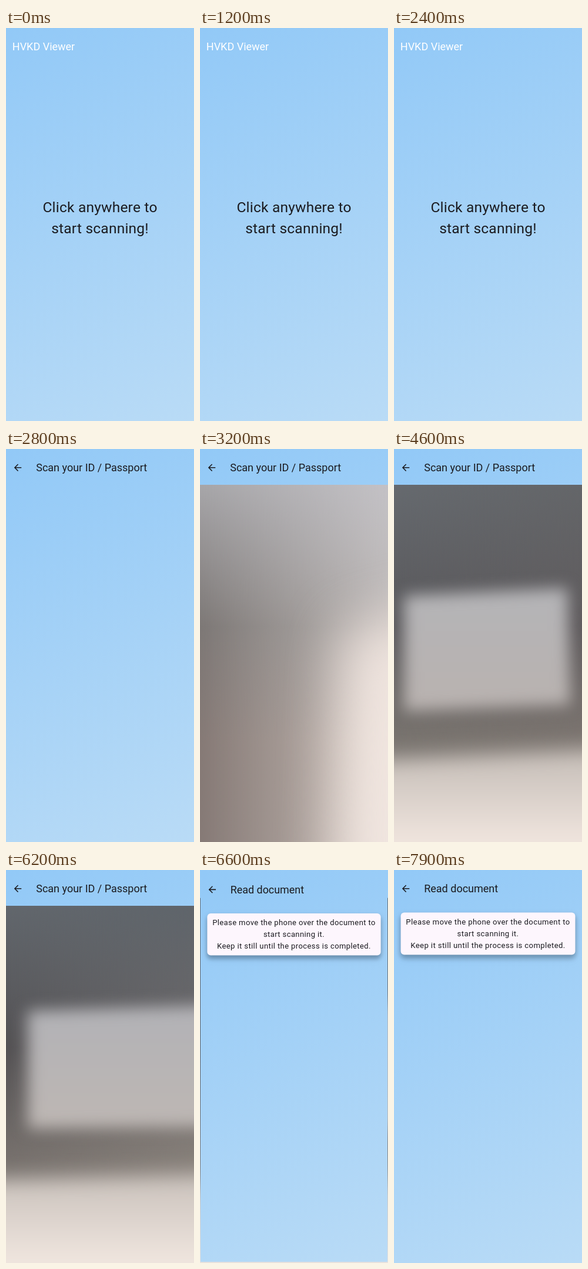
These frames come from a looping animation (320x670 px, 8000 ms). An HTML page:

```html
<!DOCTYPE html>
<html lang="en">
<head>
<meta charset="utf-8">
<title>Document scanner</title>
<style>
  html, body { margin: 0; width: 100%; height: 100%; overflow: hidden; background: #a5d1f7; }
  svg { display: block; width: 100%; height: 100%; }
  text { font-family: Roboto, sans-serif; fill: #1b1b20; white-space: pre; }
  .title { font-size: 18px; }
  .hint { font-size: 24.55px; letter-spacing: .2px; text-anchor: middle; }
  .note { font-size: 13.1px; letter-spacing: .4px; text-anchor: middle; }
</style>
</head>
<body>
<svg viewBox="0 0 320 670">
  <defs>
    <linearGradient id="sky" gradientUnits="userSpaceOnUse" x1="0" y1="0" x2="320" y2="670">
      <stop stop-color="#92c9f7"/><stop offset="1" stop-color="#b9dbf6"/>
    </linearGradient>
    <linearGradient id="left" gradientUnits="userSpaceOnUse" x1="0" y1="61" x2="0" y2="500">
      <stop/><stop offset=".55"/><stop offset="1"/>
    </linearGradient>
    <linearGradient id="right" gradientUnits="userSpaceOnUse" x1="0" y1="61" x2="0" y2="500">
      <stop/><stop offset=".55"/><stop offset="1"/>
    </linearGradient>
    <linearGradient id="paper" gradientUnits="userSpaceOnUse" x1="0" y1="240" x2="0" y2="450">
      <stop/><stop offset="1"/>
    </linearGradient>
    <linearGradient id="desk" gradientUnits="userSpaceOnUse" x1="0" y1="540" x2="0" y2="670">
      <stop/><stop offset="1"/>
    </linearGradient>
    <linearGradient id="fade"><stop stop-color="#000"/><stop offset="1" stop-color="#fff"/></linearGradient>
    <mask id="across" style="mask-type:luminance"><rect width="320" height="670" fill="url(#fade)"/></mask>
    <clipPath id="preview"><rect y="61" width="320" height="609"/></clipPath>
    <filter id="soft" filterUnits="userSpaceOnUse" x="-200" y="-100" width="720" height="970" color-interpolation-filters="sRGB">
      <feGaussianBlur stdDeviation="14"/>
    </filter>
    <filter id="deskSoft" filterUnits="userSpaceOnUse" x="-200" y="300" width="720" height="700" color-interpolation-filters="sRGB">
      <feGaussianBlur stdDeviation="17"/>
    </filter>
    <filter id="shade" x="-10%" y="-30%" width="120%" height="180%" color-interpolation-filters="sRGB">
      <feDropShadow dx="0" dy="6" stdDeviation="4" flood-color="#123" flood-opacity=".28"/>
      <feDropShadow dx="0" dy="3" stdDeviation="5" flood-color="#123" flood-opacity=".14"/>
    </filter>
    <path id="back" transform="translate(10.64 22.4) scale(.78)" fill="#1b1b20"
      d="M20 11H7.83l5.59-5.59L12 4l-8 8 8 8 1.41-1.41L7.83 13H20z"/>
  </defs>
  <rect width="320" height="670" fill="url(#sky)"/>

  <g id="home">
    <rect width="320" height="670" fill="url(#sky)"/>
    <text class="title" x="10.8" y="38.2" style="fill:#fff">HVKD Viewer</text>
    <text class="hint" x="160" y="314.4">Click anywhere to</text>
    <text class="hint" x="160" y="349.5">start scanning!</text>
  </g>

  <g id="scan">
    <rect width="320" height="670" fill="url(#sky)"/>
    <g id="camera" clip-path="url(#preview)">
      <rect width="320" height="670" fill="url(#left)"/>
      <rect width="320" height="670" fill="url(#right)" mask="url(#across)"/>
      <polygon id="sheet" fill="url(#paper)" filter="url(#soft)"/>
      <polygon id="table" fill="url(#desk)" filter="url(#deskSoft)"/>
    </g>
    <use href="#back"/>
    <text class="title" x="51.2" y="38.2">Scan your ID / Passport</text>
  </g>

  <g id="read">
    <rect width="320" height="670" fill="url(#sky)"/>
    <use href="#back"/>
    <text class="title" x="51.2" y="38.2">Read document</text>
    <rect x="11.5" y="72.5" width="297" height="72" rx="6" fill="#fdf6fd" filter="url(#shade)"/>
    <text class="note" x="160" y="93">Please move the phone over the document to</text>
    <text class="note" x="160" y="112.8">start scanning it.</text>
    <text class="note" x="160" y="132.6">Keep it still until the process is completed.</text>
  </g>
</svg>
<script>
const LOOP = 8000, OPEN_SCAN = 2500, CAMERA_ON = 2900, OPEN_READ = 6400, ZOOM = 300;
const $ = id => document.getElementById(id);
const clamp = v => Math.min(1, Math.max(0, v));
const smooth = v => v * v * (3 - 2 * v);
const easeOut = v => 1 - (1 - v) ** 3;
const mix = (a, b, k) => a.map((v, i) => v + (b[i] - v) * k);
const rgb = s => s.split(' ').map(h => [0, 2, 4].map(i => parseInt(h.substr(i, 2), 16)));

const pose = (left, right, paper, desk, sheet, table, blur) =>
  ({ colors: { left: rgb(left), right: rgb(right), paper: rgb(paper), desk: rgb(desk) }, sheet, table, blur: [blur] });

// sheet: four corners; table: height of its edge at the left and right
const wall = pose('a7a6a9 7d7876 867a76', 'c3c1c5 bdb8b6 c9bfb9', 'eadfda f0e5df', 'ebe2dc fdf4ec',
  [245, 310, 600, 220, 600, 800, 225, 800], [900, 780], 45);
const passing = pose('8f8f91 8a8785 7b7672', '868789 75726f 706c69', 'e7e3e2 e6deda', 'e6ddd7 fdf5ee',
  [-150, 212, 208, 228, 188, 476, -150, 464], [560, 592], 16);
const centred = pose('666a6f 59585b 7a7570', '646669 5f5b5d 7d7671', 'b4b4b7 b9b2af', 'cbc3bd f0e5de',
  [17, 250, 295, 237, 300, 436, 17, 447], [528, 514], 13);
const shifted = pose('62676d 555355 78726e', '5f656b 6b6768 87807a', 'b2b2b6 beb7b3', 'cec6c0 f0e6df',
  [37, 240, 420, 229, 420, 437, 37, 441], [527, 520], 13);

const track = [[3200, wall], [3700, passing], [4600, centred], [6200, shifted]];

function drawCamera(t) {
  let i = 0;
  while (i < track.length - 2 && t >= track[i + 1][0]) i++;
  const [t0, a] = track[i], [t1, b] = track[i + 1];
  const k = smooth(clamp((t - t0) / (t1 - t0)));
  for (const id in a.colors)
    [...$(id).children].forEach((stop, n) =>
      stop.setAttribute('stop-color', `rgb(${mix(a.colors[id][n], b.colors[id][n], k).map(Math.round)})`));
  const [yl, yr] = mix(a.table, b.table, k), slope = yr - yl;
  $('sheet').setAttribute('points', mix(a.sheet, b.sheet, k).join(' '));
  $('table').setAttribute('points', `-160 ${yl - slope / 2} 480 ${yr + slope / 2} 480 950 -160 950`);
  $('soft').firstElementChild.setAttribute('stdDeviation', mix(a.blur, b.blur, k)[0]);
}

function place(id, shown, scale, opacity) {
  const g = $(id);
  g.setAttribute('display', shown ? 'inline' : 'none');
  g.setAttribute('opacity', opacity);
  g.setAttribute('transform', `translate(160 335) scale(${scale}) translate(-160 -335)`);
}

function render(t) {
  const p = clamp((t - OPEN_SCAN) / ZOOM), q = clamp((t - OPEN_READ) / ZOOM);
  const enter = v => .85 + .15 * easeOut(v), leave = v => 1 + .05 * easeOut(v);
  const fade = v => clamp(v * 1.6);
  place('home', p < 1, leave(p), 1);
  place('scan', p > 0 && q < 1, enter(p) * leave(q), fade(p));
  place('read', q > 0, enter(q), fade(q));
  const live = t >= CAMERA_ON && q < 1;
  $('camera').setAttribute('display', live ? 'inline' : 'none');
  if (live) drawCamera(t);
}

function tick() {
  render(performance.now() % LOOP);
  requestAnimationFrame(tick);
}
tick();
</script>
</body>
</html>
```
